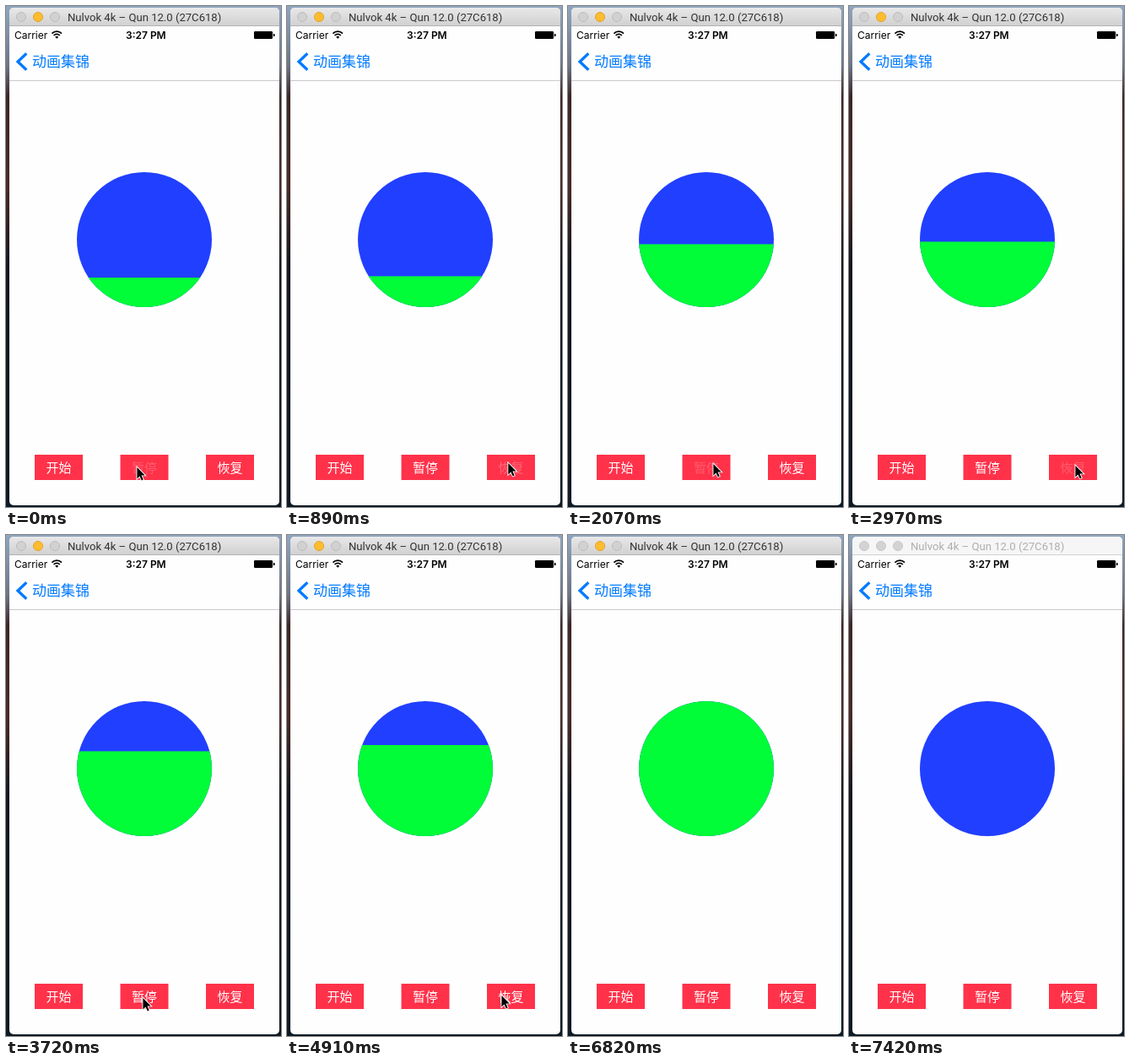
Recreate the animation shown at these times as an HTML page. Size 326x594 px, loop 7520 ms.

```html
<!DOCTYPE html>
<html lang="zh">
<head>
<meta charset="utf-8">
<title>动画集锦</title>
<style>
  html, body { margin: 0; width: 100%; height: 100%; overflow: hidden; }
  svg { display: block; width: 326px; height: 594px; }
  text { font-family: Inter, sans-serif; font-size: 12px; }
  .title { font: 13.1px Roboto, sans-serif; }
  .cjk { font-family: "Noto Sans CJK SC", "Noto Sans CJK", sans-serif; }
  .nav { font-size: 17px; fill: #007aff; }
  .button rect { fill: #ff324a; }
  .button text { font-size: 15px; fill: #fff; text-anchor: middle; }
</style>
</head>
<body>
<svg viewBox="0 0 326 594">
  <defs>
    <linearGradient id="desktop" x2="0" y2="1">
      <stop offset="0" stop-color="#8ea6c0"/>
      <stop offset=".12" stop-color="#6c7486"/>
      <stop offset=".18" stop-color="#3c2728"/>
      <stop offset=".36" stop-color="#4a2a28"/>
      <stop offset=".52" stop-color="#15171f"/>
      <stop offset="1" stop-color="#0d1a24"/>
    </linearGradient>
    <linearGradient id="bar" x2="0" y2="1">
      <stop offset="0" stop-color="#e9e8e9"/>
      <stop offset="1" stop-color="#d1d0d1"/>
    </linearGradient>
    <clipPath id="window"><rect x="4" y="2" width="320" height="590" rx="5"/></clipPath>
    <clipPath id="disc"><circle cx="164" cy="277" r="80"/></clipPath>
  </defs>

  <rect width="326" height="594" fill="url(#desktop)"/>
  <g clip-path="url(#window)">
    <rect width="326" height="594" fill="#fefefe"/>

    <g>
      <rect y="2" width="326" height="22" fill="url(#bar)"/>
      <rect y="23" width="326" height="1" fill="#b4b3b4"/>
      <g fill="#d2d1d2" stroke="#bcbbbc">
        <circle cx="18" cy="13" r="5.5"/>
        <circle cx="38" cy="13" r="5.5" fill="#fdbd2f" stroke="#e0a02a"/>
        <circle cx="58" cy="13" r="5.5"/>
      </g>
      <text class="title" x="73" y="18" fill="#333">Nulvok 4k – Qun 12.0 (27C618)</text>
    </g>
    <g id="inactive" opacity="0">
      <rect y="2" width="326" height="22" fill="#f6f6f6"/>
      <rect y="23" width="326" height="1" fill="#d2d2d2"/>
      <g fill="#d3d3d3" stroke="#c6c6c6">
        <circle cx="18" cy="13" r="5.5"/>
        <circle cx="38" cy="13" r="5.5"/>
        <circle cx="58" cy="13" r="5.5"/>
      </g>
      <text class="title" x="73" y="18" fill="#aeaeae">Nulvok 4k – Qun 12.0 (27C618)</text>
    </g>

    <text x="10" y="38.5">Carrier</text>
    <g fill="none" stroke="#000" stroke-width="1.7">
      <path d="M54.4 32.6a8.2 8.2 0 0 1 11.6 0M56.6 35a5 5 0 0 1 7.2 0"/>
      <path d="M60.2 38.8l-2-2.1a2.9 2.9 0 0 1 4 0z" fill="#000" stroke="none"/>
    </g>
    <text x="142" y="38.5" font-weight="600">3:27 PM</text>
    <rect x="294" y="30" width="22" height="9" rx="1.2"/>
    <path d="M316.8 32.7q2 .3 2 1.8t-2 1.8z"/>

    <path d="M24.3 56.2 14 66l10.3 9.8" fill="none" stroke="#007aff" stroke-width="3.3"/>
    <text class="cjk nav" x="31" y="72.3">动画集锦</text>
    <rect y="88" width="326" height="1" fill="#cbcbcd"/>

    <g clip-path="url(#disc)">
      <rect x="84" y="197" width="160" height="160" fill="#213fff"/>
      <rect id="fill" x="84" width="160" height="170" fill="#01fc38"/>
    </g>

    <g class="button" transform="translate(34 532)">
      <rect width="57" height="30"/><text class="cjk" x="28.5" y="20.7">开始</text>
    </g>
    <g class="button" transform="translate(135.5 532)">
      <rect width="57" height="30"/><text id="pause" class="cjk" x="28.5" y="20.7">暂停</text>
    </g>
    <g class="button" transform="translate(237 532)">
      <rect width="57" height="30"/><text id="resume" class="cjk" x="28.5" y="20.7">恢复</text>
    </g>
  </g>

  <path id="cursor" d="M.4 1V14.4L3.5 11.5 5.8 16.4 7.7 15.6 5.5 10.4H9.7Z" stroke="#fff" stroke-width="1.8" paint-order="stroke"/>
</svg>
<script>
const LOOP = 7520, RESET = 7420, TICK = 148.4, LEAD = 8;
const TOP = 197, BOTTOM = 357, START = 322;
const SPEED = (BOTTOM - TOP) / 5000;
const PRESS = 130, FADE = 300, EXIT = 6000;

// The pointer visits pause and resume in turn; the last stop is where it leaves.
const stops = [
  { x: 155, y: 546, arrive: 0, click: 30 },
  { x: 262, y: 541, arrive: 590, click: 870 },
  { x: 172, y: 542, arrive: 1920, click: 2170 },
  { x: 268, y: 544, arrive: 2820, click: 2990 },
  { x: 162, y: 548, arrive: 3570, click: 3940 },
  { x: 254, y: 545, arrive: 4610, click: 5060 },
  { x: 289, y: 556, arrive: 5940 }
];
const clicks = stops.slice(0, -1).map(stop => stop.click);

const [fill, cursor, pause, resume, inactive] =
  ['fill', 'cursor', 'pause', 'resume', 'inactive'].map(id => document.getElementById(id));

const clamp = v => Math.min(1, Math.max(0, v));
const smooth = v => v * v * (3 - 2 * v);
const mix = (a, b, k) => a + (b - a) * k;

function level(t) {
  if (t >= RESET) return BOTTOM;
  const paused = clicks.reduce((sum, c, i) => sum + (i % 2 ? -1 : 1) * Math.max(0, t - c), 0);
  return Math.max(TOP, START - SPEED * (t - paused));
}

// A label dims while its button is held and fades back after release.
function labelOpacity(t, parity) {
  const click = clicks.findLast((c, i) => i % 2 === parity && t >= c - PRESS);
  return click === undefined ? 1 : mix(.2, 1, clamp((t - click) / FADE));
}

function pointer(t) {
  const i = Math.min(stops.findLastIndex(stop => t >= stop.arrive), stops.length - 2);
  const from = stops[i], to = stops[i + 1];
  const k = smooth(clamp((t - from.click) / (to.arrive - from.click)));
  return [mix(from.x, to.x, k), mix(from.y, to.y, k)];
}

function draw() {
  const now = performance.now() % LOOP;
  const t = Math.floor((now + LEAD) / TICK) * TICK;
  fill.setAttribute('y', level(t));
  pause.setAttribute('opacity', labelOpacity(t, 0));
  resume.setAttribute('opacity', labelOpacity(t, 1));
  cursor.setAttribute('transform', `translate(${pointer(t)})`);
  cursor.setAttribute('opacity', t < EXIT ? 1 : 0);
  inactive.setAttribute('opacity', t < RESET ? 0 : 1);
  requestAnimationFrame(draw);
}
draw();
</script>
</body>
</html>
```
